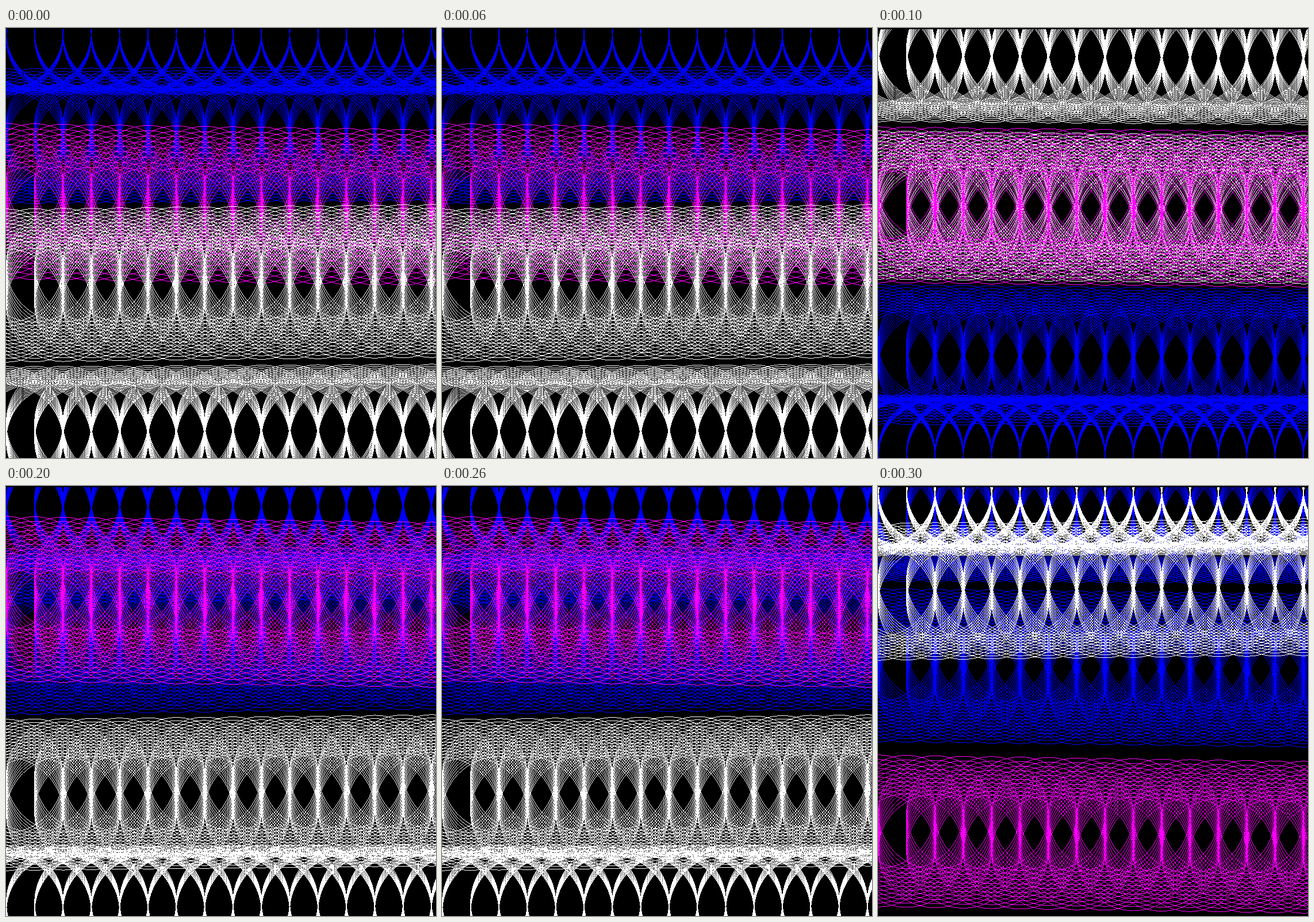
Write an HTML page with a canvas that moves like this. It is 748x748 px and loops after 0.4 s.

```html
<!DOCTYPE html>
<html lang="en">
<head>
<meta charset="utf-8">
<title>Circle waves</title>
<style>
  html, body { margin: 0; width: 100%; height: 100%; overflow: hidden; background: #000; }
  canvas { display: block; width: 748px; height: 748px; }
</style>
</head>
<body>
<canvas id="stage" width="748" height="748"></canvas>
<script>
const SIZE = 748, TOP = 2, STEP_MS = 100;
const GAP = 49.3, RADIUS = GAP * 2, COLUMNS = 18;
const MID = 375, SWING = 373;

// Colour as ABGR, and the phase between neighbouring rows.
const BLUE = { rgb: 0xffff0000, step: 0.0165 };
const PINK = { rgb: 0xffff00ff, step: 0.025 };
const WHITE = { rgb: 0xffffffff, step: 0.0165 };

// Each band: ink, first and last centre height, drift across the stage.
const SCENES = [
  [
    [BLUE, 6, 17, 0],
    [BLUE, 169, 207, -5],
    [PINK, 264, 338, 11],
    [WHITE, 413, 482, -8],
    [WHITE, 687, 718, -4]
  ],
  [
    [WHITE, 31, 64, 5],
    [WHITE, 277, 338, 8],
    [PINK, 270, 344, 8],
    [BLUE, 544, 590, 8],
    [BLUE, 736, 747, 1]
  ],
  [
    [BLUE, 24, 51, -4],
    [BLUE, 226, 299, -10],
    [PINK, 151, 241, 10],
    [WHITE, 504, 570, -8],
    [WHITE, 724, 741, -2]
  ],
  [
    [BLUE, 36, 67, 4],
    [BLUE, 276, 346, 9],
    [PINK, 566, 633, 11],
    [WHITE, 5, 22, -2],
    [WHITE, 163, 204, -8]
  ]
];

const ctx = document.getElementById("stage").getContext("2d");

// Height on the vertical swing <-> its phase.
const phaseOf = y => Math.acos((MID - y) / SWING);
const heightAt = phase => MID - SWING * Math.cos(phase);

function plot(pixels, x, y, rgb) {
  x = Math.round(x);
  y = Math.round(y);
  if (x >= 0 && x < SIZE && y >= TOP && y < SIZE) pixels[y * SIZE + x] = rgb;
}

// One-pixel circle without smoothing.
function circle(pixels, cx, cy, rgb) {
  for (let a = 0; a <= RADIUS * Math.SQRT1_2; a++) {
    const b = Math.sqrt(RADIUS * RADIUS - a * a);
    for (const u of [-a, a]) {
      for (const v of [-b, b]) {
        plot(pixels, cx + u, cy + v, rgb);
        plot(pixels, cx + v, cy + u, rgb);
      }
    }
  }
}

function band(pixels, [ink, from, to, drift]) {
  const start = phaseOf(from), span = phaseOf(to) - start;
  const gaps = Math.round(span / ink.step);
  for (let row = 0; row <= gaps; row++) {
    const y = heightAt(start + span * row / gaps);
    for (let col = 0; col < COLUMNS; col++) {
      circle(pixels, col * GAP, y + drift * col / 15, ink.rgb);
    }
  }
}

function render(bands) {
  const image = ctx.createImageData(SIZE, SIZE);
  const pixels = new Uint32Array(image.data.buffer).fill(0xff000000);
  bands.forEach(b => band(pixels, b));
  return image;
}

const images = SCENES.map(render);
let shown = -1;

function draw() {
  const index = Math.floor(performance.now() / STEP_MS) % images.length;
  if (index !== shown) {
    ctx.putImageData(images[index], 0, 0);
    shown = index;
  }
  requestAnimationFrame(draw);
}
draw();
</script>
</body>
</html>
```
